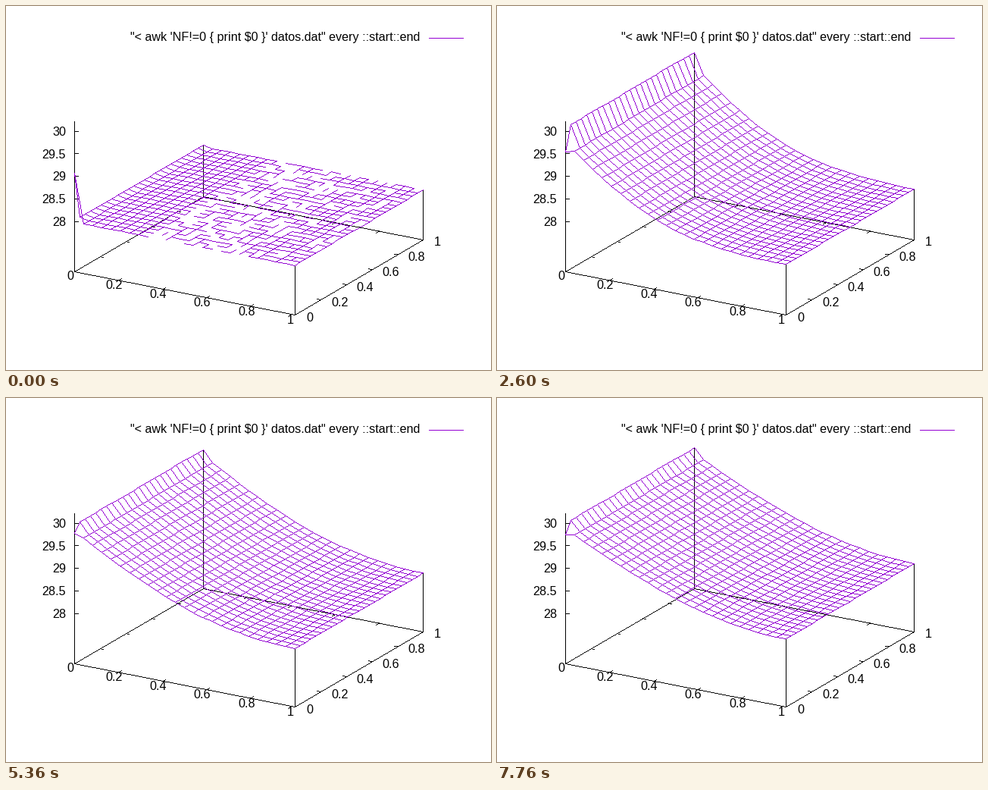
A matplotlib script that plays this animation: 640x480 px, repeating every 7.8 s.

```python
import math

import matplotlib.pyplot as plt
import numpy as np
from matplotlib.animation import FuncAnimation

W, H = 640, 480
FRAMES, STEP_MS = 195, 40
N = 24                      # cells per side
BLACK, PURPLE = (0, 0, 0), (148, 0, 211)
DIFFUSION = 0.001           # per frame, domain length 1
REST = 65.4                 # height of the cold plate above the base, px
Z_UNIT = 59.5               # px per degree
FONT = 14.5                 # points, about 16 px

plt.rcParams["font.family"] = "Liberation Sans"
fig = plt.figure(figsize=(8, 6), dpi=80, facecolor="white")
ax = fig.add_axes([0, 0, 1, 1])


def project(x, y, height=0.0):
    return np.stack([90.4 + 290.7 * x + 169.8 * y,
                     350.5 + 57 * x - 99.4 * y - height], axis=-1)


def draw_lines(canvas, segments, color):
    """Hard one-pixel lines: one dot per step along the longer axis."""
    seg = np.floor(np.asarray(segments, float))
    start, delta = seg[:, 0], seg[:, 1] - seg[:, 0]
    steps = np.maximum(np.abs(delta).max(axis=1), 1)
    t = np.minimum(np.arange(steps.max() + 1) / steps[:, None], 1)
    dots = start[:, None] + t[..., None] * delta[:, None]
    cols, rows = np.floor(dots + 0.5).astype(int).reshape(-1, 2).T
    canvas[rows.clip(0, H - 1), cols.clip(0, W - 1)] = color


def label(x, y, text, ha="center"):
    ax.text(x, y, text, ha=ha, va="baseline", fontsize=FONT, color="black")


def tick(x, y, dx, dy):
    start = project(x, y)
    return start, start + (dx, dy)


def make_background():
    canvas = np.full((H, W, 3), 255, np.uint8)
    ring = [project(*p) for p in ((0, 0), (1, 0), (1, 1), (0, 1), (0, 0))]
    segments = list(zip(ring, ring[1:])) + [((90, 152), (90, 350))]
    for v in (0.2, 0.4, 0.6, 0.8):
        segments += [tick(v, 0, 4, -2.3), tick(v, 1, -4, 2.3),
                     tick(0, v, 4.4, 0.9), tick(1, v, -4.4, -0.9)]
    for i in range(5):
        y = 284 - i * Z_UNIT / 2
        segments.append(((90, y), (95, y)))
    draw_lines(canvas, segments, BLACK)
    draw_lines(canvas, [((558, 42), (603, 42))], PURPLE)
    return canvas


def add_labels():
    for i, name in enumerate(["28", "28.5", "29", "29.5", "30"]):
        label(79, round(290 - i * Z_UNIT / 2), name, "right")
    for i, name in enumerate(["0", "0.2", "0.4", "0.6", "0.8", "1"]):
        label(84.5 + 58.2 * i, round(361.4 + 11.6 * i), name)
        label(400.5 + 33.8 * i + (6 if 0 < i < 5 else 0),
              round(416 - 20 * i), name)
    label(546, 46, "\"< awk 'NF!=0 { print $0 }' datos.dat\" "
                   "every ::start::end", "right")


def profile(k):
    """Heat entering at x=0, insulated at x=1."""
    spread = 2 * math.sqrt(DIFFUSION * max(k, 0.01))
    hot = 97 + 1.1 * math.sqrt(k)
    return np.array([hot * (math.erfc(x / spread) + math.erfc((2 - x) / spread))
                     for x in grid])


def boundary(k):
    """Heights of the hot edge and of its front corner."""
    mean = 110 - 380 / (k + 7)
    phase = -36 + 36.07 * (k - 35)
    edge = mean + 24 * math.cos(math.radians(phase))
    corner = mean + 24 * math.cos(math.radians(phase + 152 + 0.05 * (k - 35)))
    return (edge if k else 2), corner


grid = np.linspace(0, 1, N + 1)
X, Y = np.meshgrid(grid, grid, indexing="ij")

# Edges lying in the perfectly flat part are hidden irregularly.
rng = np.random.default_rng(4)
keep_x = rng.random((N, N + 1)) < np.where(X[:-1] > 0.72, 0.8, 0.62)
keep_y = rng.random((N + 1, N)) < np.where(X[:, :-1] > 0.72, 0.72, 0.45)
keep_y[-1] = True

background = make_background()
picture = ax.imshow(background, extent=(0, W, H, 0), aspect="auto",
                    interpolation="nearest")
add_labels()
ax.set(xlim=(0, W), ylim=(H, 0))
ax.axis("off")


def update(k):
    u = profile(k)
    flat = grid > 0.3 + 0.04 * k
    height = np.repeat(u[:, None], N + 1, axis=1)
    height[0], height[0, 0] = boundary(k)
    pts = project(X, Y, REST + height)

    along_x = np.stack([pts[:-1], pts[1:]], axis=2)
    along_y = np.stack([pts[:, :-1], pts[:, 1:]], axis=2)
    canvas = background.copy()
    draw_lines(canvas, [(pts[i, j], project(grid[i], grid[j]))
                        for i, j in ((0, N), (N, 0), (N, N))], BLACK)
    draw_lines(canvas, np.concatenate([
        along_x[keep_x | ~flat[:-1, None]],
        along_y[keep_y | ~flat[:, None]]]), PURPLE)
    picture.set_data(canvas)
    return [picture]


anim = FuncAnimation(fig, update, frames=FRAMES, interval=STEP_MS,
                     repeat=True, repeat_delay=0, blit=False)
plt.show()
```
